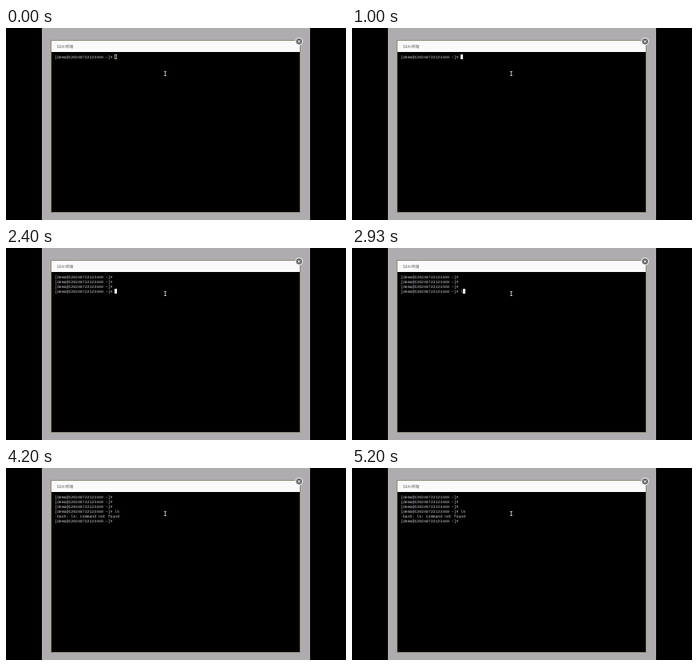
An HTML page for the animation above (5270 ms loop, 426 by 240 pixels).

```html
<!DOCTYPE html>
<html lang="en">
<head>
<meta charset="utf-8">
<title>SSH terminal</title>
<style>
  html, body { margin: 0; width: 100%; height: 100%; overflow: hidden; background: #000; }
  svg { display: block; width: 100vw; height: 100vh; }
  text { text-rendering: geometricPrecision; white-space: pre; }
  .title { font: 5px "Noto Sans CJK SC", "Noto Sans CJK", "Liberation Sans", sans-serif; fill: #5c5a58; }
  #lines { font: 4.84px "Liberation Mono", monospace; fill: #d2d0d8; }
</style>
</head>
<body>
<svg viewBox="0 0 426 240">
  <rect x="45" width="336" height="240" fill="#afacaf"/>
  <rect x="56.5" y="15.5" width="312" height="215" fill="#000" stroke="#8c8a78"/>
  <rect x="57" y="16" width="311" height="14" fill="#fafafa"/>
  <text class="title" x="63.7" y="25">SSH 终端</text>
  <circle cx="367.2" cy="16.8" r="4.3" fill="#666" stroke="#f4f4f4" stroke-width="1.1"/>
  <path d="M365.6 15.2l3.2 3.2m0-3.2l-3.2 3.2" stroke="#fff" stroke-width=".9"/>
  <g id="lines"></g>
  <rect id="cursor"/>
  <path d="M198 54.5h3M199.5 54v6M198 59.5h3" fill="none" stroke="#c0c0c0" stroke-width=".9"/>
</svg>
<script>
const LOOP = 5270, BLINK = 500, FOCUS = 600;
const LEFT = 61, TOP = 36, ROW = 6, CHAR = 4.84 * 0.6;
const PROMPT = "[demo@C20240722123440 ~]# ";

// Key presses: [time in ms, key]
const keys = [[1270, "\n"], [1600, "\n"], [2000, "\n"], [2800, "l"], [3000, "k"], [3270, "\n"]];

const group = document.getElementById("lines");
const cursor = document.getElementById("cursor");

function setAll(node, attributes) {
  for (const name in attributes) node.setAttribute(name, attributes[name]);
}

const rows = Array.from({ length: 6 }, (_, i) => {
  const row = document.createElementNS("http://www.w3.org/2000/svg", "text");
  setAll(row, { x: LEFT, y: TOP + i * ROW + 1.7 });
  return group.appendChild(row);
});

function terminalAt(time) {
  const lines = [PROMPT];
  let command = "", last = FOCUS;
  for (const [at, key] of keys) {
    if (at > time) break;
    last = at;
    if (key === "\n") {
      if (command) lines.push(`-bash: ${command}: command not found`);
      lines.push(PROMPT);
      command = "";
    } else {
      command += key;
      lines[lines.length - 1] += key;
    }
  }
  return { lines, last };
}

function draw(now) {
  const time = now % LOOP;
  const { lines, last } = terminalAt(time);
  rows.forEach((row, i) => { row.textContent = lines[i] || ""; });

  const focused = time >= FOCUS;
  const lit = !focused || Math.floor((time - last) / BLINK) % 2 === 0;
  const end = lines.length - 1;
  const inset = focused ? 0 : 0.4;
  setAll(cursor, {
    x: Math.floor(LEFT + lines[end].length * CHAR) + inset,
    y: TOP + end * ROW - 3 + inset,
    width: 3 - 2 * inset,
    height: 6 - 2 * inset,
    fill: focused ? "#fff" : "none",
    stroke: focused ? "none" : "#c8c8b8",
    "stroke-width": 0.8,
    visibility: lit ? "visible" : "hidden"
  });
  requestAnimationFrame(draw);
}
requestAnimationFrame(draw);
</script>
</body>
</html>
```
